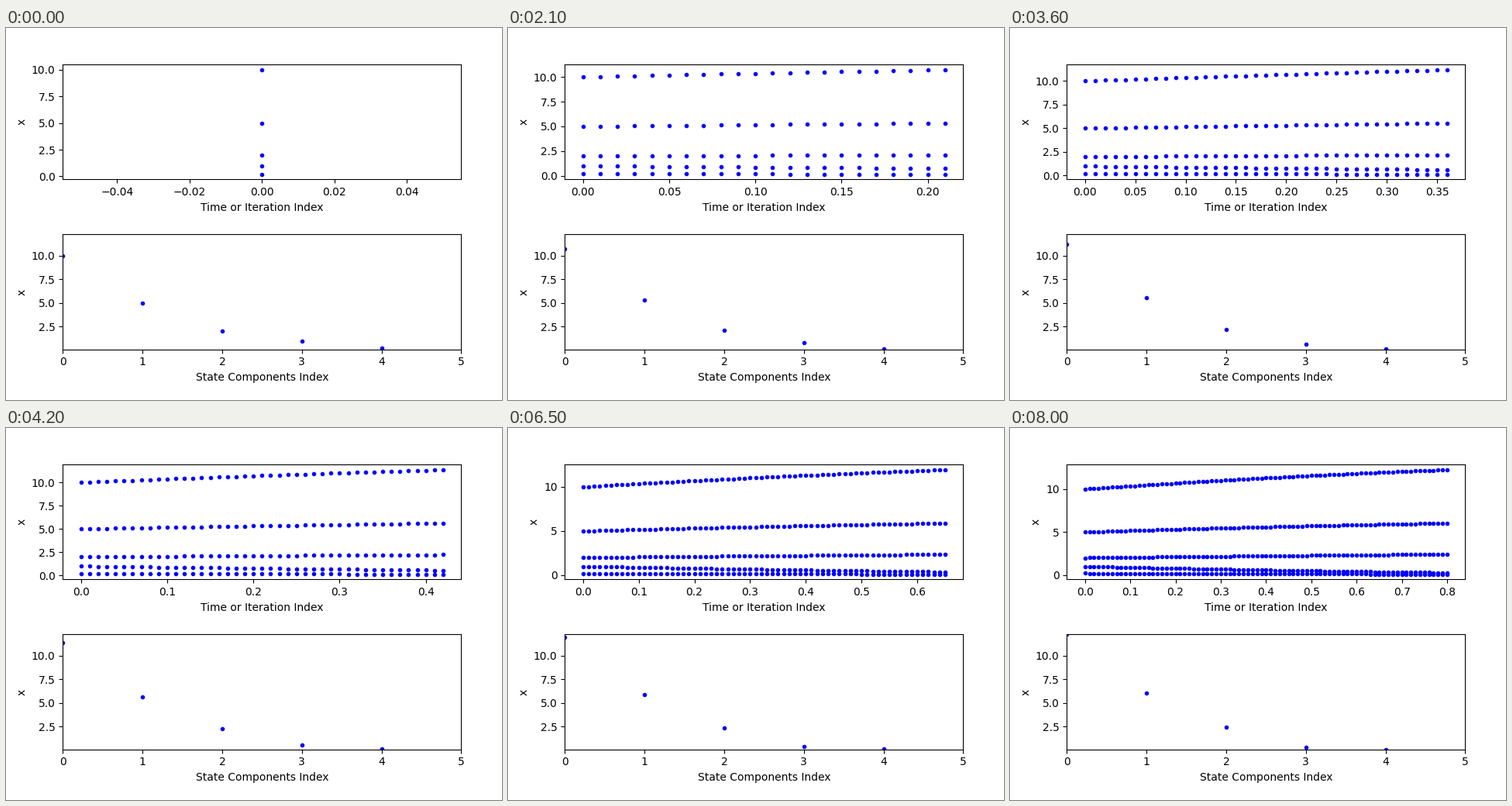
A matplotlib script for the animation above (8100 ms loop, 640 px wide and 480 px high).

```python
import numpy as np
import matplotlib.pyplot as plt
from matplotlib.animation import FuncAnimation

STEPS = 81
DT = 0.01

# Five states; all but the third follow one reaction's progress.
time = np.arange(STEPS) * DT
progress = 1.2 * time - 0.35 * time**2
states = np.column_stack([
    10 + 3.06 * progress,
    5 + 1.4 * progress,
    2 + 0.6 * time - 0.09 * time**2,
    1 - progress,
    0.2 - 0.15 * progress,
])
count = states.shape[1]

fig, (history_ax, current_ax) = plt.subplots(2, 1, figsize=(6.4, 4.8), dpi=100)
fig.tight_layout(pad=3.0)

history, = history_ax.plot([], [], "b.")
history_ax.set(xlabel="Time or Iteration Index", ylabel="x")

current, = current_ax.plot([], [], "b.")
current_ax.set(xlabel="State Components Index", ylabel="x",
               xlim=(0, count), ylim=(states.min(), states.max()))


def update(step):
    shown = step + 1
    history.set_data(np.repeat(time[:shown], count), states[:shown].ravel())
    history_ax.relim()
    history_ax.autoscale_view()
    current.set_data(np.arange(count), states[step])
    return history, current


anim = FuncAnimation(fig, update, frames=STEPS, interval=100,
                     repeat=True, repeat_delay=0)
plt.show()
```
